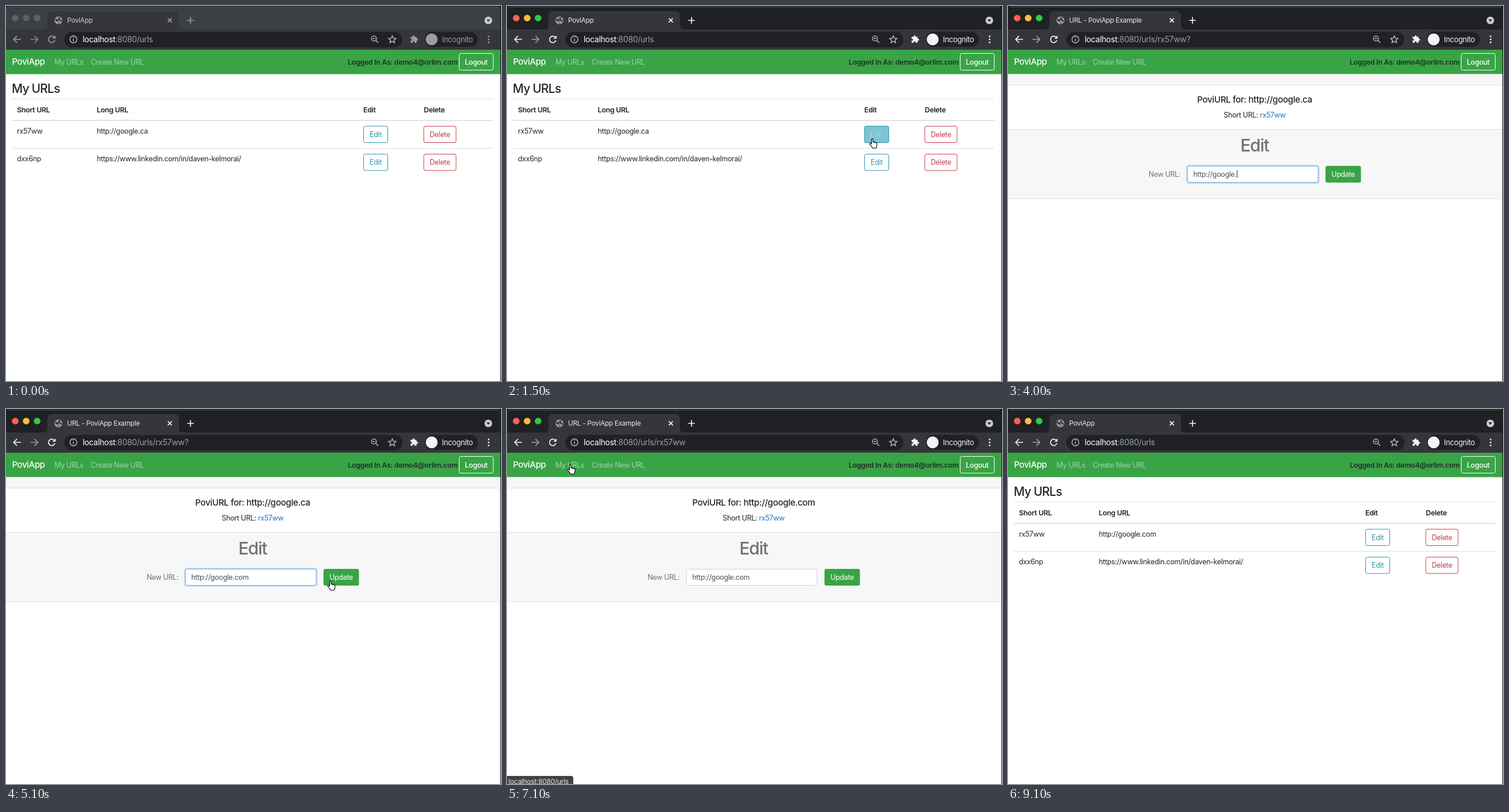
These frames come from a looping animation (859x652 px, 9200 ms). An HTML page:

```html
<!DOCTYPE html>
<html lang="en">
<head>
<meta charset="utf-8">
<title>PoviApp</title>
<style>
html, body { margin: 0; width: 100%; height: 100%; overflow: hidden; background: #000; }
svg { display: block; width: 859px; height: 652px; --icon: #f1f3f4; --dim: #9aa0a6; --strip: #202124; }
svg.inactive { --icon: #9a9da1; --dim: #85888c; --strip: #3c3f43; }
text { font-family: Inter, "Liberation Sans", sans-serif; font-size: 12.4px; letter-spacing: -.025em; font-optical-sizing: none; fill: #212529; white-space: pre; }
.mid { text-anchor: middle; }
.bold { font-weight: 600; }
.medium { font-weight: 500; }
.white { fill: #fff; }
.line { fill: none; stroke: var(--icon); stroke-width: 1.7; }
.thin { fill: none; stroke: #c4c7ca; stroke-width: 1.3; }
.rule { stroke: #dcdfe2; fill: none; }
.inactive .light { fill: #5f6164; }
.tab { font-size: 11.8px; fill: #e8eaed; }
.inactive .tab { fill: #cdcfd1; }
.nav { fill: #fff; opacity: .52; }
</style>
</head>
<body>
<svg id="stage" viewBox="0 0 859 652">
  <rect width="859" height="652" fill="#000"/>
  <rect y="1" width="858" height="651" rx="3" style="fill:var(--strip)"/>
  <path d="M2 1.5H856" stroke="#5b5d60"/>

  <!-- tab strip -->
  <circle class="light" cx="16" cy="21" r="5.8" fill="#fc605c"/>
  <circle class="light" cx="35" cy="21" r="5.8" fill="#fdbc40"/>
  <circle class="light" cx="54" cy="21" r="5.8" fill="#34c749"/>
  <path d="M64 41q8 0 8-8V17q0-8 8-8H292q8 0 8 8V33q0 8 8 8Z" fill="#35363a"/>
  <circle cx="91" cy="25" r="6.8" fill="#9aa0a6"/>
  <path d="M86 22q4 1 5 3t-3 2q-2-1-3-3ZM91 19.5l4 1-2 2.5 4 2-1 3-3-2-3-3ZM90 28l3 1-2 2Z" fill="#35363a"/>
  <text class="tab" id="tab" x="106" y="28.5"></text>
  <path class="line" d="M280.8 21.3l7 7m0-7l-7 7M314.5 25h11.5M320.25 19.2v11.5"/>
  <circle cx="837" cy="25" r="6.6" fill="#c9cbce"/>
  <path d="M833.8 23.3h6.4l-3.2 4.2Z" style="fill:var(--strip)"/>

  <!-- toolbar -->
  <rect y="41" width="858" height="35" fill="#35363a"/>
  <rect x="101" y="45" width="587" height="27" rx="13.5" fill="#202124"/>
  <rect x="727" y="45" width="92" height="26" rx="13" fill="#202124"/>
  <path class="line" d="M26 58H13.5m5.6-5.8L13.3 58l5.8 5.8"/>
  <path class="line" d="M42.5 58H55m-5.6-5.8L55.2 58l-5.8 5.8" style="stroke:var(--dim)"/>
  <path class="line" d="M83.9 54.6a5.6 5.6 0 1 0 .9 5"/>
  <path d="M86 51.2v5.6h-5.6Z" style="fill:var(--icon)"/>
  <circle class="thin" cx="117" cy="58" r="6"/>
  <path class="thin" d="M117 57v4.2M117 54.3v1.5"/>
  <text x="133" y="62.5" style="font-size:14px;fill:#fff">localhost<tspan id="path" fill="#9aa0a6"></tspan></text>
  <circle class="thin" cx="638.5" cy="56.5" r="4.3"/>
  <path class="thin" d="M641.7 59.7l4.3 4.3M636.3 56.5h4.4"/>
  <path class="thin" d="M670.3 51.8l1.8 4.2 4.6.4-3.5 3 1.1 4.5-4-2.4-4 2.4 1.1-4.5-3.5-3 4.6-.4Z"/>
  <path transform="translate(700.8 50.3) scale(.62)" style="fill:var(--icon)" d="M20.5 11H19V7a2 2 0 0 0-2-2h-4V3.5a2.5 2.5 0 0 0-5 0V5H4a2 2 0 0 0-2 2v3.8h1.5a2.7 2.7 0 0 1 0 5.4H2V20a2 2 0 0 0 2 2h3.8v-1.5a2.7 2.7 0 0 1 5.4 0V22H17a2 2 0 0 0 2-2v-4h1.5a2.5 2.5 0 0 0 0-5z"/>
  <circle cx="738.7" cy="58" r="10.3" style="fill:var(--icon)"/>
  <text x="756.5" y="62.6" style="font-size:12.9px;fill:var(--icon)">Incognito</text>
  <path d="M837.5 52.8v.01M837.5 58v.01M837.5 63.2v.01" style="stroke:var(--icon);stroke-width:3;stroke-linecap:round"/>

  <!-- page -->
  <rect y="76" width="858" height="576" fill="#fff"/>
  <rect y="76" width="858" height="42.5" fill="#39a446"/>
  <text class="white medium" x="10.5" y="102.3" style="font-size:14.9px">PoviApp</text>
  <text class="nav" x="84" y="101.7">My URLs</text>
  <text class="nav" x="147" y="101.7">Create New URL</text>
  <text class="bold" x="593" y="101.7" style="fill:#1f3226">Logged In As: demo4@orlim.com</text>
  <rect x="786.5" y="82.5" width="59" height="29" rx="3" fill="none" stroke="#fff"/>
  <text class="white mid medium" x="816" y="101.7">Logout</text>

  <g id="list">
    <text class="medium" x="10" y="151" style="font-size:20.8px;letter-spacing:-.035em">My URLs</text>
    <path class="rule" d="M10 161.5H846M10 247.5H846"/>
    <path class="rule" d="M10 198.8H846" stroke-width="1.7"/>
    <text class="bold" x="19" y="185">Short URL</text>
    <text class="bold" x="157.5" y="185">Long URL</text>
    <text class="bold" x="620" y="185">Edit</text>
    <text class="bold" x="725" y="185">Delete</text>
    <text x="19" y="221.8">rx57ww</text>
    <text id="long" x="157.5" y="221.8"></text>
    <text x="19" y="270.2">dxx6np</text>
    <text x="157.5" y="270.2">https://www.linkedin.com/in/daven-kelmorai/</text>
    <g id="buttons"></g>
    <g id="hover">
      <rect x="620" y="208.5" width="43" height="29.5" rx="3" fill="#2199b1"/>
      <text class="white mid" x="641" y="227.8">Edit</text>
    </g>
  </g>

  <g id="edit">
    <path d="M0 118.5H858V137H0ZM0 215H858V335H0Z" fill="#f7f7f7"/>
    <path class="rule" d="M0 137.5H858M0 214.5H858M0 335H858"/>
    <text class="medium mid" id="heading" x="428" y="167.8" style="font-size:15.2px"></text>
    <text class="mid" x="428" y="194.3">Short URL: <tspan fill="#2270cc">rx57ww</tspan></text>
    <text class="medium mid" x="428" y="253.3" style="font-size:30px;letter-spacing:-.04em;fill:#6f7276">Edit</text>
    <text x="244" y="297" style="fill:#6f7276">New URL:</text>
    <rect id="ring" x="310.5" y="277.5" width="228.5" height="30" rx="4" fill="none" stroke="#bcd6f7" stroke-width="3"/>
    <rect id="box" x="311.5" y="278.5" width="226.5" height="28" rx="3" fill="#fff"/>
    <text id="field" x="321.5" y="297" style="fill:#495057"></text>
    <path id="caret" d="M0 285v14" stroke="#333"/>
    <rect id="update" x="551" y="278" width="61.5" height="29" rx="3"/>
    <text class="white mid" x="581.7" y="297">Update</text>
  </g>

  <g id="status">
    <path d="M0 638H111q4 0 4 4V652H0Z" fill="#414245"/>
    <text x="2.5" y="652" style="font-size:12px;fill:#e3e4e6">localhost:8080/urls</text>
  </g>

  <g id="cursor">
    <path id="arrow" d="M.5 0V14.8l3.4-3.1 2.3 5.2 2.6-1.1-2.3-5.2h4.6Z" fill="#000" stroke="#fff"/>
    <path id="hand" d="M-1.4 9V1.2a1.3 1.3 0 0 1 2.6 0V6c.3-1 2.2-.9 2.4.3.4-.8 2-.6 2.2.5.6-.6 2.2-.4 2.2 1V11c0 2-1.4 2.6-1.4 5H.2C0 14-3.5 11.5-4.5 9.3-5.2 7.7-3 7-1.4 9Z" fill="#fff" stroke="#000" stroke-width="1.1"/>
    <path id="beam" d="M-3.5-7.5Q0-7.5 0-5.5Q0-7.5 3.5-7.5M0-5.5V5.5M-3.5 7.5Q0 7.5 0 5.5Q0 7.5 3.5 7.5M-2 2.5h4" fill="none" stroke="#111" stroke-width="1.4"/>
  </g>
  <path d="M858.5 0V652" stroke="#111"/>
</svg>
<script>
const LOOP = 9200, STEP = 100;
const $ = id => document.getElementById(id);
const show = (id, on) => $(id).style.display = on ? '' : 'none';
const put = (id, text) => { if ($(id).textContent !== text) $(id).textContent = text; };
const between = (t, a, b) => t >= a && t < b;

const button = (x, y, w, label, color) =>
  `<rect x="${x}" y="${y}" width="${w}" height="28.5" rx="3" fill="#fff" stroke="${color}"/>
   <text class="mid" x="${x + w / 2}" y="${y + 18.8}" style="fill:${color}">${label}</text>`;
$('buttons').innerHTML = [209, 257.5].map(y =>
  button(620.5, y, 42, 'Edit', '#2896ae') + button(725, y, 56, 'Delete', '#c83c4a')).join('');

// pointer stops: time, x, y
const stops = [
  [0, 36, 436], [100, 36, 436], [500, 803, 94], [800, 655, 300], [900, 655, 300],
  [1400, 638, 235], [1500, 634, 231], [1700, 635, 228], [2600, 635, 228], [3000, 466, 301],
  [4600, 466, 301], [5100, 563, 299], [5800, 563, 299], [6200, 196, 141], [6400, 196, 141],
  [6900, 110, 97], [7500, 110, 97], [8100, 250, 230], [8300, 250, 230], [9000, 330, 660], [LOOP, 330, 660]
];

function pointer(t) {
  const i = stops.findIndex(s => s[0] > t);
  const [t0, x0, y0] = stops[i - 1], [t1, x1, y1] = stops[i];
  const p = (t - t0) / (t1 - t0), k = p * p * (3 - 2 * p);
  return [x0 + (x1 - x0) * k, y0 + (y1 - y0) * k];
}

const typed = [[4300, 'com'], [4200, 'c'], [3800, ''], [3700, 'c'], [0, 'ca']];

function draw(t) {
  const active = t >= 1000, editing = between(t, 2200, 7200), saved = t >= 5400;
  const focus = between(t, 3200, 5400);
  const link = 'http://google.' + (saved ? 'com' : 'ca');
  const [x, y] = pointer(t);
  const over = (l, top, r, b) => active && x >= l && x <= r && y >= top && y <= b;

  $('stage').classList.toggle('inactive', !active);
  show('list', !editing);
  show('edit', editing);
  put('tab', editing ? 'URL - PoviApp Example' : 'PoviApp');
  put('path', ':8080/urls' + (editing ? '/rx57ww' + (saved ? '' : '?') : ''));
  put('long', link);
  put('heading', 'PoviURL for: ' + link);
  put('field', 'http://google.' + typed.find(s => t >= s[0])[1]);
  $('hover').style.opacity = t < 2200 ? Math.min(1, Math.max(0, (t - 1400) / 175)) : 0;

  show('ring', focus);
  $('box').setAttribute('stroke', focus ? '#84b3ec' : '#ced2d6');
  show('caret', between(t, 3200, 4700));
  if (editing) $('caret').setAttribute('transform',
    `translate(${322.5 + $('field').getComputedTextLength()} 0)`);
  $('update').setAttribute('fill', between(t, 5200, 5900) ? '#2f8a3b' : '#39a446');

  $('status').style.opacity = between(t, 6900, 7500) ? 1 : t === 7500 ? .85 : t === 7600 ? .4 : 0;

  const hand = over(84, 88, 134, 106) ||
    (editing ? over(551, 278, 612, 307) : over(620, 208, 663, 238));
  const beam = editing && !hand && over(311, 278, 539, 307);
  show('cursor', t >= 100 && !between(t, 3700, 4700) && t < 9000);
  $('cursor').setAttribute('transform', `translate(${x} ${y})`);
  show('hand', hand);
  show('beam', beam);
  show('arrow', !hand && !beam);
}

const start = performance.now();
function tick() {
  const t = (performance.now() - start) % LOOP;
  draw(Math.floor(t / STEP) * STEP);
  requestAnimationFrame(tick);
}
tick();
</script>
</body>
</html>
```
